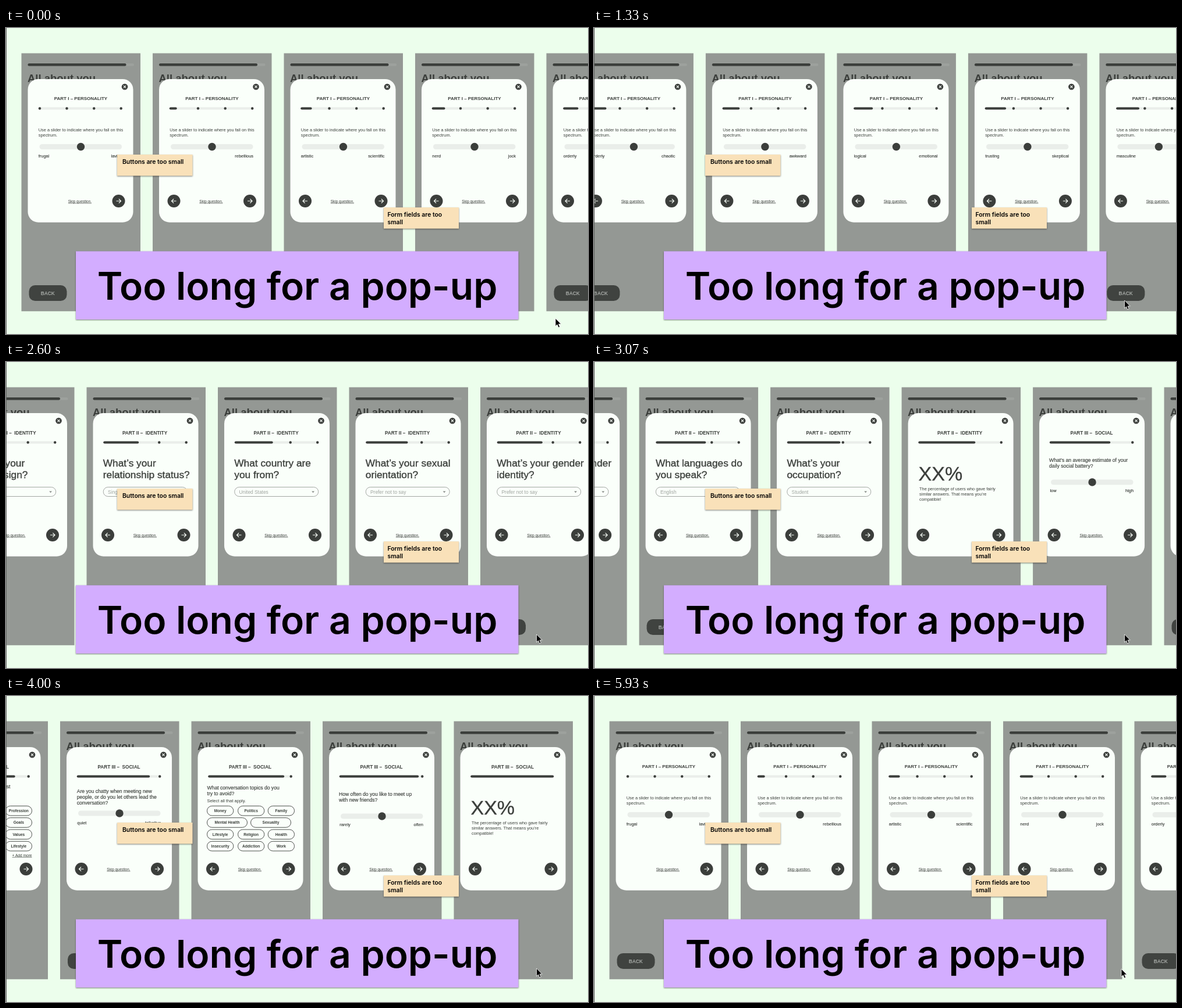
An HTML page for the animation above (6000 ms loop, 1000 px wide and 527 px high).

```html
<!DOCTYPE html>
<html lang="en">
<head>
<meta charset="utf-8">
<title>Too long for a pop-up</title>
<style>
  html, body { margin: 0; width: 100%; height: 100%; overflow: hidden; background: #ecfeec; }
  svg { display: block; width: 100%; height: 100%; }
  text { font-family: "Liberation Sans", Arial, sans-serif; fill: #3b3e3b; white-space: pre; }
  .medium { stroke: #3b3e3b; stroke-width: .35; }
  .small { stroke: #3b3e3b; stroke-width: .15; }
  .bold { font-weight: 700; }
  .link { text-decoration: underline; }
  .hint { fill: #a0a4a0; }
  .note { font: 600 10.4px Inter, sans-serif; fill: #000; }
  .banner { font: 600 66px Inter, sans-serif; fill: #000; }
  .shadow { filter: drop-shadow(0 1px 1px rgba(0, 0, 0, .5)); }
</style>
</head>
<body>
<svg viewBox="0 0 1000 527">
  <rect width="1000" height="527" fill="#ecfeec"/>
  <g id="strip"></g>
  <rect width="1" height="527" fill="#626662"/>
  <g class="shadow">
    <rect x="191" y="218" width="129.5" height="36.5" fill="#f9e1b9"/>
    <rect x="649" y="309" width="129" height="36.5" fill="#f9e1b9"/>
  </g>
  <text class="note" x="200" y="234">Buttons are too small</text>
  <text class="note" x="655.5" y="325">Form fields are too</text>
  <text class="note" x="655.5" y="337.7">small</text>
  <rect class="shadow" x="120" y="384.5" width="760.5" height="117.5" fill="#d3adff"/>
  <text class="banner" x="500.5" y="467.5" text-anchor="middle">Too long for a pop-up</text>
  <path id="cursor" d="M0 0V13.6L3.1 10.8L5.2 15.8L7.6 14.8L5.5 9.9H9.7Z" fill="#000" stroke="#fff" stroke-width=".8"/>
</svg>
<script>
const DARK = "#3b3e3b", TRACK = "#eaeeea", WHITE = "#fafffa";
const PITCH = 225.5, LEFT = 26.5, LOOP = 6000, FRAME = 1000 / 15;

const rect = (x, y, w, h, fill, r = 0, extra = "") =>
  `<rect x="${x}" y="${y}" width="${w}" height="${h}" rx="${r}" fill="${fill}" ${extra}/>`;
const circle = (x, y, r) => `<circle cx="${x}" cy="${y}" r="${r}" fill="${DARK}"/>`;
const text = (x, y, size, value, cls = "", anchor = "start") =>
  `<text x="${x}" y="${y}" font-size="${size}" class="${cls}" text-anchor="${anchor}">${value}</text>`;
const lines = (x, y, step, size, value, cls) =>
  value.split("|").map((line, i) => text(x, y + i * step, size, line, cls)).join("");

function slider(low, high, y = 204.5, labelY = 223) {
  return rect(31, y - 4.5, 141.5, 9, TRACK, 4.5) + circle(102, y, 6.7) +
    text(29.3, labelY, 7.4, low, "small") + text(173, labelY, 7.4, high, "small", "end");
}

const spectrum = (low, high) =>
  lines(29.3, 177.5, 9, 7.35, "Use a slider to indicate where you fall on this|spectrum.") + slider(low, high);

const result = () =>
  text(29, 204, 34, "XX%", "medium") +
  lines(30.5, 220.7, 9, 7.35, "The percentage of users who gave fairly|similar answers. That means you’re|compatible!");

function dropdown(question, value, link = "") {
  return lines(28.3, 180, 20.3, 17.3, question, "medium") +
    rect(28.7, 215.5, 144, 16, WHITE, 8, 'stroke="#9a9e9a" stroke-width=".9"') +
    text(36.5, 226.6, 8.4, value, "hint") +
    `<path d="M161.2 222.4h4.8l-2.4 2.8z" fill="#858985"/>` +
    (link && text(172.5, 241, 6.3, link, "link", "end"));
}

const question = (x, y, value) => lines(x, y, 10.2, 8.6, value, "small");

const pill = (x, y, w, label) =>
  rect(x, y - 8.3, w, 16.6, WHITE, 8.3, `stroke="${DARK}" stroke-width=".9"`) +
  text(x + w / 2, y + 2.4, 6.6, label, "bold", "middle");

function choices(x, y, ask, sub, rows, columns, link = "") {
  const pills = rows.split("|").map((row, r) => {
    const names = row.split(",");
    const rowY = 197.7 + r * 20.3;
    if (names.length === 2) return pill(27, rowY, 69, names[0]) + pill(102, rowY, 69, names[1]);
    return names.map((name, c) => pill(columns[c], rowY, 45.3, name)).join("");
  }).join("");
  return question(x, y, ask) + text(x, y + 22, 7.5, sub) + pills +
    (link && text(177, 276.5, 6.6, link, "link", "end"));
}

const personality = [
  ["frugal", "lavish"], ["obedient", "rebellious"], ["artistic", "scientific"], ["nerd", "jock"],
  ["orderly", "chaotic"], ["charming", "awkward"], ["logical", "emotional"], ["trusting", "skeptical"],
  ["masculine", "feminine"], ["creative", "conventional"], ["arcane", "mainstream"]
].map(pair => spectrum(...pair)).concat(result());

const identity = [
  dropdown("What’s your|zodiac sign?", "Aries"),
  dropdown("What’s your|relationship status?", "Single"),
  dropdown("What country are|you from?", "United States"),
  dropdown("What’s your sexual|orientation?", "Prefer not to say"),
  dropdown("What’s your gender|identity?", "Prefer not to say"),
  dropdown("What languages do|you speak?", "English", "+ Add language"),
  dropdown("What’s your|occupation?", "Student"),
  result()
];

const social = [
  question(28, 172, "What’s an average estimate of your|daily social battery?") + slider("low", "high", 207, 223.5),
  choices(26.3, 158.5, "What values do you appreciate the|most in others?", "Select your top 3.",
    "Honesty,Integrity,Respect|Positivity,Compassion,Reliability|Loyalty,Humility,Courage|Generosity,Fairness,Openness",
    [26.5, 79.8, 130.7]),
  choices(26.7, 158.5, "What commonalities are most|important to you?", "Select your top 3.",
    "Humor,Politics,Profession|Culture,Interests,Goals|Age,Religion,Values|LGBTQ+,Personality,Lifestyle",
    [27.5, 80, 131.7], "+ Add more"),
  question(28.7, 166.7, "Are you chatty when meeting new|people, or do you let others lead the|conversation?") +
    slider("quiet", "talkative", 202, 221),
  choices(27, 160.7, "What conversation topics do you|try to avoid?", "Select all that apply.",
    "Money,Politics,Family|Mental Health,Sexuality|Lifestyle,Religion,Health|Insecurity,Addiction,Work",
    [27, 80, 131.7]),
  question(28, 172, "How often do you like to meet up|with new friends?") + slider("rarely", "often", 207, 223.5),
  result()
];

const sections = [
  { title: "PART I – PERSONALITY", x: 102, y: 124, size: 8, cards: personality,
    progress: i => i < 2 ? 13 * i : 19.4 + (i - 2) * 3.42 },
  { title: "PART II –  IDENTITY", x: 100, y: 125, size: 8.2, cards: identity,
    progress: i => [55.5, 61, 66, 72.3, 78.2, 86, 91.5, 98][i] },
  { title: "PART III –  SOCIAL", x: 101, y: 125, size: 8.2, cards: social,
    progress: i => [104.5, 110, 119.5, 125.5, 131, 136.5, 143][i] }
];

function progressBar(width) {
  const dots = [31.5, 78, 124.7, 171.2].filter(x => x - 28.5 > width);
  return rect(28.7, 136.6, 144, 3.9, TRACK, 2) +
    (width ? rect(28.7, 136.4, width, 4.2, DARK, 2.1) : "") +
    dots.map(x => circle(x, 138.5, 2.2)).join("");
}

const arrowButton = (x, dir) => circle(x, 298, 11) +
  `<path transform="translate(${x} 298) scale(${dir} 1)" d="M-4 0H4M.4-3.6L4 0L.4 3.6" fill="none" stroke="${WHITE}" stroke-width="1.2"/>`;

function card(body, section, i, index) {
  const isResult = body === result();
  return `<g transform="translate(${LEFT + PITCH * index} 0)">` +
    rect(0, 43.5, 204.5, 444.3, "#949894") +
    rect(11, 61, 182.5, 4.4, "#9da19d", 2.2) + rect(11, 61, 169, 4.4, DARK, 2.2) +
    text(10.5, 92.7, 18.5, "All about you", "bold") +
    rect(13, 443, 65, 27, "#404340", 10.5) +
    `<text x="45.3" y="459.6" font-size="8.4" font-weight="700" text-anchor="middle" style="fill:#a4a8a4">BACK</text>` +
    rect(11, 88, 181, 246.7, WHITE, 18) +
    circle(177.5, 101.3, 5.3) +
    `<path d="M175.4 99.2l4.2 4.2m0-4.2l-4.2 4.2" stroke="${WHITE}" stroke-width="1.1"/>` +
    text(section.x, section.y, section.size, section.title, "bold", "middle") +
    progressBar(section.progress(i)) + body +
    (index ? arrowButton(36.5, -1) : "") + arrowButton(167, 1) +
    (isResult ? "" : text(100.4, 300.6, 6.4, "Skip question.", "link", "middle")) +
    "</g>";
}

let index = 0;
const strip = document.getElementById("strip");
strip.innerHTML = sections.map(s => s.cards.map((body, i) => card(body, s, i, index++)).join("")).join("");

// Scroll keys: time (ms), offset (px), velocity (px/ms)
const keys = [
  [0, 0, .25], [733, 392.5, .82], [1933, 1705, 1.4], [2600, 2819.5, 1.9], [3467, 4562, 1.7], [4000, 5120, 0],
  [4533, 5120, 0], [5000, 3144, -5.8], [5667, 0, 0], [LOOP, 0, 0]
];

function scrollAt(t) {
  const n = keys.findIndex(key => key[0] >= t);
  if (n < 1) return 0;
  const [t0, p0, v0] = keys[n - 1], [t1, p1, v1] = keys[n];
  const d = t1 - t0, u = (t - t0) / d, w = 1 - u;
  return w * w * ((1 + 2 * u) * p0 + u * d * v0) + u * u * ((3 - 2 * u) * p1 - w * d * v1);
}

const cursor = document.getElementById("cursor");

function draw(time) {
  const step = Math.floor((time % LOOP + 4) / FRAME) % 90;
  const t = step * FRAME;
  const [x, y] = t < 60 ? [944, 500] : t < 4590 ? [911.5, 469] : [906, 470];
  strip.setAttribute("transform", `translate(${-scrollAt(t).toFixed(2)} 0)`);
  cursor.setAttribute("transform", `translate(${x} ${y})`);
}

const start = performance.now();
function tick() {
  draw(performance.now() - start);
  requestAnimationFrame(tick);
}
tick();
</script>
</body>
</html>
```
